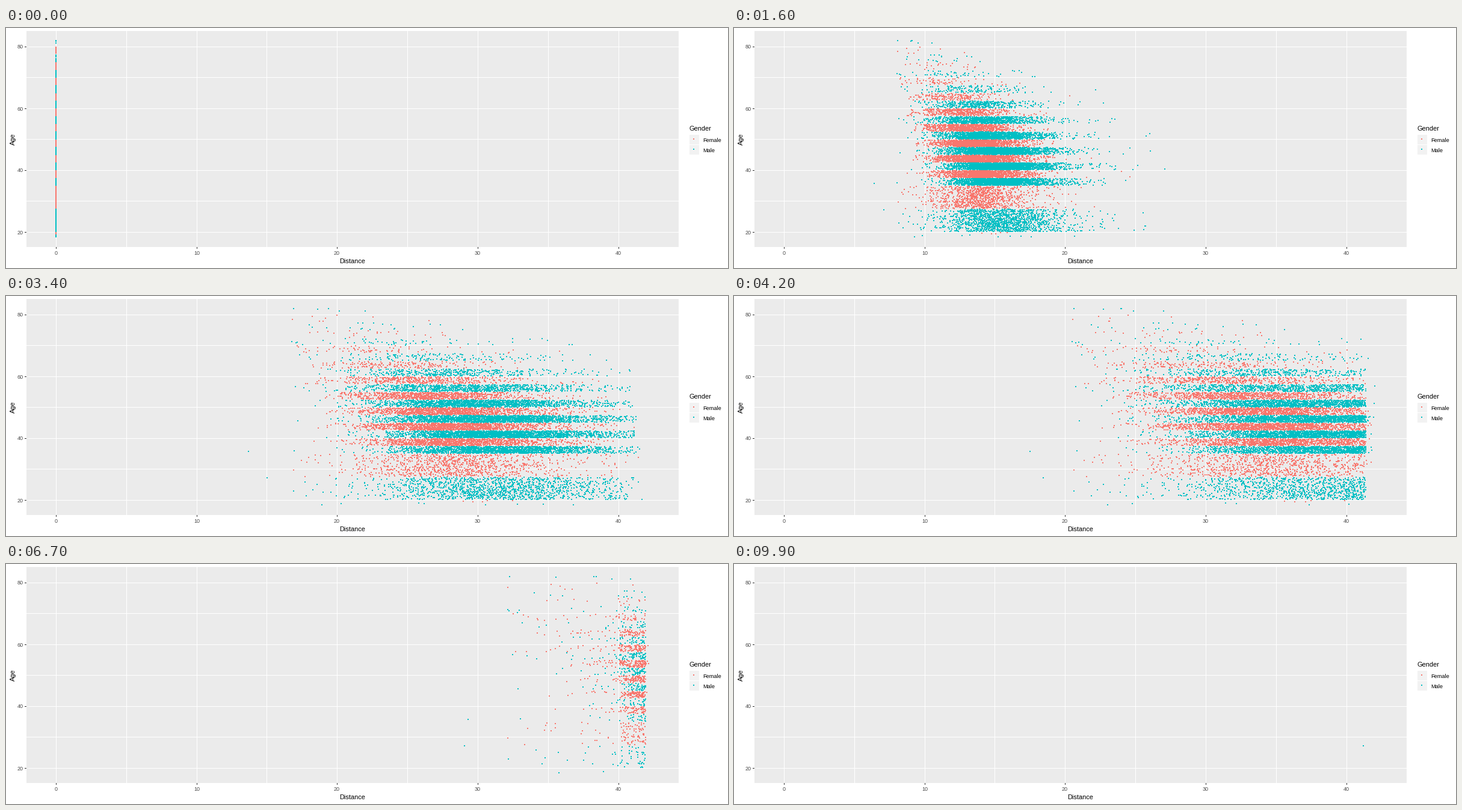
Write a matplotlib script that moves like this. It is 1200x400 px and loops after 10000 ms.

```python
import numpy as np
import matplotlib.pyplot as plt
from matplotlib.animation import FuncAnimation
from matplotlib.patches import Rectangle

W, H, FRAMES = 1200, 400, 100
SALMON, TEAL = "#F8766D", "#00BFC4"
REF = 16          # speeds are given as km covered after REF steps
FADE_FROM = 13    # km after which runners lose pace
rng = np.random.default_rng(42)

plt.rcParams["font.family"] = "Liberation Sans"
fig = plt.figure(figsize=(W / 72, H / 72), dpi=72, facecolor="white")
ax = fig.add_axes([0, 0, 1, 1])
ax.set(xlim=(0, W), ylim=(H, 0))
ax.axis("off")


def px(km):
    return 83 + 23.375 * km


def py(age):
    return 340.5 - 5.15 * (age - 20)


def rect(x, y, w, h, color):
    ax.add_patch(Rectangle((x, y), w, h, fc=color, lw=0, antialiased=False))


def label(x, y, text, size=9, color="black", ha="center", **kw):
    ax.text(x, y, text, fontsize=size, color=color, ha=ha, va="center", **kw)


def draw_chart():
    rect(34, 5, 1084, 360, "#EBEBEB")
    for km in range(0, 45, 5):
        x = int(px(km) + 0.3)
        rect(x, 5, 1, 360, "white")
        if km % 10 == 0:
            rect(x, 365, 1, 3, "#333333")
            label(x, 376, str(km), color="#4D4D4D")
    for age in range(20, 81, 10):
        y = int(py(age) - 0.3)
        rect(34, y, 1084, 1, "white")
        if age % 20 == 0:
            rect(31, y, 3, 1, "#333333")
            label(29, y + 1, str(age), color="#4D4D4D", ha="right")
    label(576, 389.5, "Distance", 11)
    label(12, 185.5, "Age", 11, rotation=90)
    label(1135, 168, "Gender", 11, ha="left")
    for y, name, color in ((177, "Female", SALMON), (194, "Male", TEAL)):
        rect(1136, y + 1, 16, 16, "#F2F2F2")
        rect(1142, y + 7, 2, 2, color)
        label(1158, y + 10.3, name, 9.3, ha="left")


# age bands, men and women in turn
EDGES = np.r_[18.2, 19.2, 20, 27.5, np.arange(35, 81, 2.5), 82.2]
YOUNG = [9, 5, 1500, 1000]    # field size of the bands below 35


def field_size(i, peak, rise, fall):
    if i < len(YOUNG):
        return YOUNG[i]
    a = EDGES[i]
    return round(peak / (1 + np.exp((rise - a) / 3) + np.exp((a - fall) / 4.5)))


class Runners:
    def __init__(self, color, first, size, mean, spread, walkers=()):
        speed, age = [], []
        for i in range(first, len(EDGES) - 1, 2):
            lo, hi = EDGES[i:i + 2]
            n = field_size(i, *size)
            z = 0.93 * rng.standard_t(12, n)
            wide = spread * (1.2 if lo < 35 else 1)
            v = mean - 0.003 * max(lo - 35, 0) ** 2
            v = v + wide * (z + 0.06 * (z * z - 1))
            speed.append(np.minimum(8 + np.abs(v - 8), 26.7) / REF)
            age.append(rng.uniform(lo + 0.2, hi - 0.05, n))
        v = np.concatenate(speed)
        # the regular field has 40 km behind it by step 84
        most = (84 * v - 40) / (84 * v - FADE_FROM)
        fade = np.minimum(rng.normal(0.08, 0.04, len(v)), most)

        extra = np.reshape(walkers, (-1, 3))
        self.speed = np.r_[v, extra[:, 0] / REF]
        self.y = np.round(py(np.r_[np.concatenate(age), extra[:, 1]]))
        self.fade = np.r_[fade, extra[:, 2]]

        # last stretch: slow creep from 40 km on, then gone
        self.t40 = (40 - FADE_FROM * self.fade) / (1 - self.fade) / self.speed
        late = np.maximum(self.t40 - 24, 0)
        self.creep = 0.19 + 1.2 * np.exp(-(late / 18) ** 2)
        reach = np.minimum(0.9 + 0.03 * late, 2.15)
        strays = rng.random(len(reach)) < 0.07
        reach[strays] = rng.uniform(reach[strays], 2.18)
        self.end = np.minimum(self.t40 + reach / self.creep, FRAMES - 1.5)
        if len(extra):
            self.end[self.t40.argmax()] = FRAMES
        self.dots, = ax.plot([], [], "s", ms=2, mew=0, color=color,
                             antialiased=False)

    def move(self, t):
        u = self.speed * t
        km = u - self.fade * np.maximum(u - FADE_FROM, 0)
        km = np.where(t > self.t40, 40 + self.creep * (t - self.t40), km)
        on = t < self.end
        self.dots.set_data(np.round(px(km[on])), self.y[on])
        return self.dots


draw_chart()
# walkers: speed, age, pace loss
groups = [
    Runners(SALMON, 1, (1750, 34, 53), 14.3, 1.75),
    Runners(TEAL, 0, (2700, 32, 52.5), 15.8, 2.1,
            [(6.4, 35.8, -0.18), (7.12, 27.3, 0.045)]),
]


def update(t):
    return [g.move(t) for g in groups]


anim = FuncAnimation(fig, update, frames=FRAMES, interval=100,
                     repeat=True, repeat_delay=0, blit=False)
plt.show()
```
